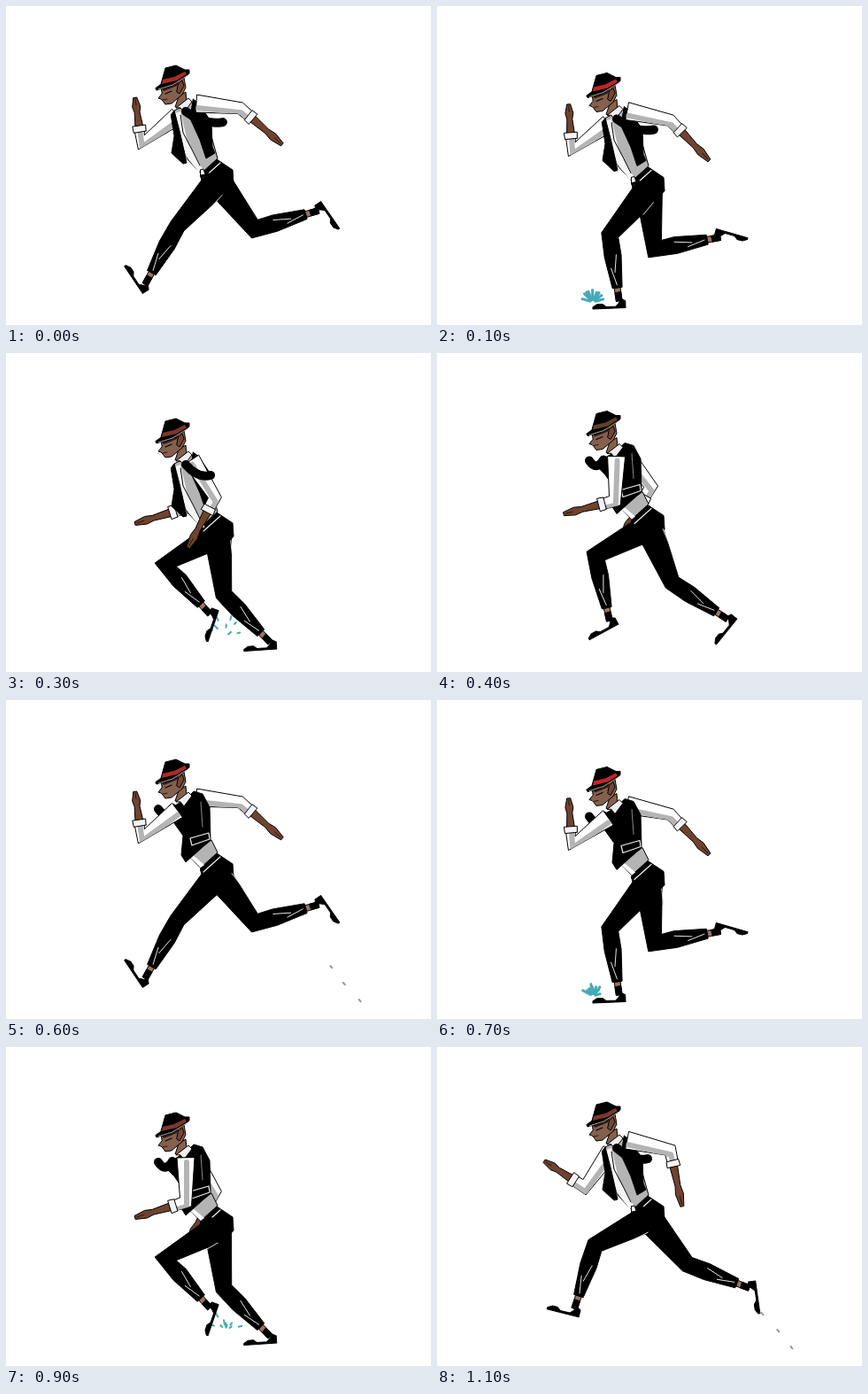
Animation, 480 px wide and 360 px high, one loop 1.2 s. Source, as an HTML page with a canvas:

```html
<!DOCTYPE html>
<html>
<head>
<meta charset="utf-8">
<title>Runner</title>
<style>
html, body { margin: 0; width: 100%; height: 100%; overflow: hidden; background: #fff; }
canvas { display: block; }
</style>
</head>
<body>
<canvas id="stage" width="480" height="360"></canvas>
<script>
const c = document.getElementById('stage').getContext('2d');
const INK = '#000', SKIN = '#70432f', FACE = '#84604d', GREY = '#b4b4b4', WATER = '#45a9b7';
const STEPS = 12, HALF = 6, STEP_MS = 100;
const THIGH = 68, SHIN = 60, ANKLE = 15, UPPER_ARM = 50, SLEEVE_END = 17;

// Angles in degrees from straight down: thigh, shin, foot, upper arm, forearm.
// Both sides run through the same cycle, half a turn apart.
const cycle = {
  0: [-42, -29, -146, 84, 49],
  1: [-40, 8, -88, 78, 44],
  3: [6, 44, -86, 32, -28],
  5: [40, 69, 8, -36, -123],
  6: [38, 106, 35, -54, -172],
  7: [6, 100, 74, -55, -176],
  9: [-60, 42, -19, 0, -73],
  11: [-63, -18, -104, 77, 12]
};
const pose = step => cycle[step] ||
  cycle[step - 1].map((a, i) => (a + cycle[step + 1][i]) / 2);

const rad = deg => deg * Math.PI / 180;
const wave = (step, peak, period) => Math.cos((step - peak) * 2 * Math.PI / period);
const go = ([x, y], deg, len) => [x + len * Math.sin(rad(deg)), y + len * Math.cos(rad(deg))];
const mix = (a, b, k) => [a[0] + (b[0] - a[0]) * k, a[1] + (b[1] - a[1]) * k];

function seeded(seed) {
  return () => (seed = seed * 16807 % 2147483647) / 2147483647;
}

function trace(p) {
  c.beginPath();
  for (let i = 0; i < p.length; i += 2) c.lineTo(p[i], p[i + 1]);
}
function poly(p, fill, edge = INK) {
  trace(p);
  c.closePath();
  c.fillStyle = fill;
  c.fill();
  if (!edge) return;
  c.strokeStyle = edge;
  c.lineWidth = 1;
  c.stroke();
}
function line(p, color, width = 1) {
  trace(p);
  c.strokeStyle = color;
  c.lineWidth = width;
  c.stroke();
}

// A band of changing width along a chain of joints, mitred at the bends.
function ribbon(joints, widths, fill) {
  const left = [], right = [];
  joints.forEach((p, i) => {
    const a = joints[Math.max(i - 1, 0)], b = joints[Math.min(i + 1, joints.length - 1)];
    const din = Math.atan2(p[1] - a[1], p[0] - a[0]), dout = Math.atan2(b[1] - p[1], b[0] - p[0]);
    const first = a === p ? dout : din, last = b === p ? din : dout;
    const x = Math.cos(first) + Math.cos(last), y = Math.sin(first) + Math.sin(last);
    const size = Math.hypot(x, y);
    const r = widths[i] / 2 * Math.min(2 / size, 1.35) / size;
    left.push(p[0] - y * r, p[1] + x * r);
    right.unshift(p[0] + y * r, p[1] - x * r);
  });
  poly([...left, ...right], fill);
}

function shoe(ankle, deg) {
  c.save();
  c.translate(...ankle);
  c.rotate(rad(90 - deg));
  c.translate(-7, -8);
  poly([0,0, 1,8, 5,10, 12,9, 20,6, 30,5, 37,2, 37,0], '#fff', null);
  poly([0,0, 0,8, 4,10, 8,5, 11,2, 22,2, 26,5, 32,5, 37,2, 37,0], INK);
  c.restore();
}

function leg(hip, [thigh, shin, foot], near) {
  const knee = go(hip, thigh, THIGH), cuff = go(knee, shin, SHIN);
  const ankle = go(cuff, shin, ANKLE), calf = mix(knee, cuff, .4);
  shoe(ankle, foot);
  ribbon([cuff, ankle], [7, 6], '#9a7362');
  ribbon([mix(cuff, ankle, .35), ankle], [7, 7], INK);
  ribbon([hip, knee, calf, cuff], [31, 18, 19, 11], INK);
  for (const side of [-1, 1]) {
    const from = go(mix(knee, cuff, .5 - side * .12), shin + 90, side * 4);
    line([...from, ...go(from, shin - side * 12, 20)], '#e4e4e4');
  }
  if (near) {
    const seam = go(hip, thigh + 90, 14);
    line([...go(seam, thigh, 8), ...go(seam, thigh, 26)], '#ddd');
  }
}

function arm(base, [, , , upper, fore]) {
  const swing = Math.sin(rad(upper));
  const shoulder = [base[0] + 12 * swing, base[1] - 8 * swing];
  const elbow = go(shoulder, upper, UPPER_ARM), cuff = go(elbow, fore, SLEEVE_END);
  const tip = go(elbow, fore, 58 + 7 * Math.cos(rad(fore)));
  const sleeve = [shoulder, elbow, cuff];
  ribbon([cuff, mix(cuff, tip, .5), mix(cuff, tip, .7), tip], [9, 6, 9, 4], SKIN);
  line([...mix(cuff, tip, .75), ...mix(cuff, tip, .95)], '#24120c');
  c.save();
  ribbon(sleeve, [20, 13, 12], '#fff');
  c.clip();
  line(sleeve.flatMap(([x, y]) => [x + 1, y + 5]), GREY, 6);
  c.restore();
  ribbon([go(elbow, fore, SLEEVE_END - 5), go(cuff, fore, 2)], [14, 15], '#f4f4f4');
}

function pelvis() {
  poly([219,190, 238,172, 256,184, 257,199, 244,214, 224,205], INK);
  line([223,193, 242,176], '#eee', 1.2);
}

function openVest() {
  poly([190,117, 204,110, 214,106, 228,132, 239,171, 220,188, 205,172, 188,130], GREY);
  poly([191,120, 197,118, 205,152, 222,183, 218,187, 203,168], '#f5f5f5', null);
  poly([186,122, 190,117, 196,140, 199,153, 204,176, 200,177, 187,165, 190,146], INK);
  poly([211,104, 217,108, 232,130, 233,158, 236,165, 226,171, 219,150, 208,126], INK);
  line([197,122, 200,142, 211,163, 219,179], INK);
  poly([219,184, 223,183, 225,189, 220,190], '#fff');
}
function closedVest() {
  poly([207,176, 232,157, 239,171, 220,188], GREY);
  poly([207,176, 211,174, 224,185, 220,188], '#fff', null);
  poly([180,128, 184,122, 203,111, 212,102, 222,105, 230,120, 231,157, 203,182, 198,174, 200,152, 190,138], INK);
  line([208,155, 229,149, 230,156, 210,163, 208,155], '#eee', 1.2);
  line([220,114, 222,142], '#aaa', .8);
}

function head(band) {
  poly([191,113, 195,101, 203,96, 204,107, 198,114], FACE);
  poly([192,114, 206,103, 210,107, 201,119, 197,114], '#eee');
  poly([175,92, 201,80, 203,91, 199,99, 193,104, 187,109, 180,110, 177,106, 175,104, 172,103, 176,98], FACE);
  poly([176,92, 195,84, 193,89, 186,92, 178,95], '#2b1b16', null);
  poly([194,87, 199,83, 201,89, 196,98, 193,96], '#744634');
  line([180,98, 187,95], INK, 1.2);
  line([177,105, 182,104], '#291713');
  line([171,104, 174,107], '#ddd');
  poly([175,87, 180,69, 192,66, 202,71, 207,71, 207,75, 200,81, 184,90, 170,94, 169,92], INK);
  poly([177,82, 190,79, 202,73, 204,76, 193,83, 176,87], band, null);
  line([172,93, 188,88, 204,78], '#ccc', .8);
}

function tie(step, open) {
  const end = open ? 238 + 8 * wave(step, .5, HALF) : 172;
  const [x, y] = open ? [203, 118] : [188, 121];
  c.beginPath();
  c.moveTo(x, y);
  c.quadraticCurveTo((x + end) / 2, 134, end, open ? 130 : 122);
  c.strokeStyle = INK;
  c.lineWidth = 10;
  c.stroke();
}

// Streaks fly from the landing foot, then a few drops trail behind the runner.
function splash(step) {
  const age = (step + HALF - 1) % HALF, rnd = seeded(step * 977 + 31);
  const x = 176 + 36 * age, y = 334 - 7 * age;
  if (age < 3) for (let i = 0; i < 9; i++) {
    const deg = 105 + 150 * (i + rnd()) / 9;
    const from = go([x, y], deg, 3 + age * 9 * rnd());
    line([...from, ...go(from, deg, (11 - 3 * age) * (.5 + rnd() / 2))], WATER, 3 - age / 2);
  }
  if (step && age > 3) for (let i = 0; i < 3; i++) {
    const from = [366 + 14 * i + 6 * rnd(), 300 + 19 * i];
    line([...from, ...go(from, 40, 3)], '#8f9d9d', 2);
  }
}

function drawStep(step) {
  const near = pose(step), far = pose((step + HALF) % STEPS);
  const open = (step + 2) % STEPS < HALF;
  const hip = [239, 197], shoulder = [203, 117];
  const glow = wave(step, 1, HALF);
  c.fillStyle = '#fff';
  c.fillRect(0, 0, 480, 360);
  c.lineJoin = c.lineCap = 'round';
  splash(step);

  c.save();
  c.translate(0, 4.5 + 8.5 * wave(step, 1.9, HALF));
  arm(shoulder, far);
  leg(hip, far);
  pelvis();
  leg(hip, near, true);
  if (open) openVest(); else closedVest();
  head(`rgb(${145 + 45 * glow}, ${50 - 12 * glow}, 42)`);
  if (!open) tie(step, open);
  arm(shoulder, near);
  if (open) tie(step, open);
  c.restore();
}

const start = performance.now();
function tick() {
  drawStep(Math.floor((performance.now() - start) / STEP_MS) % STEPS);
  requestAnimationFrame(tick);
}
tick();
</script>
</body>
</html>
```
